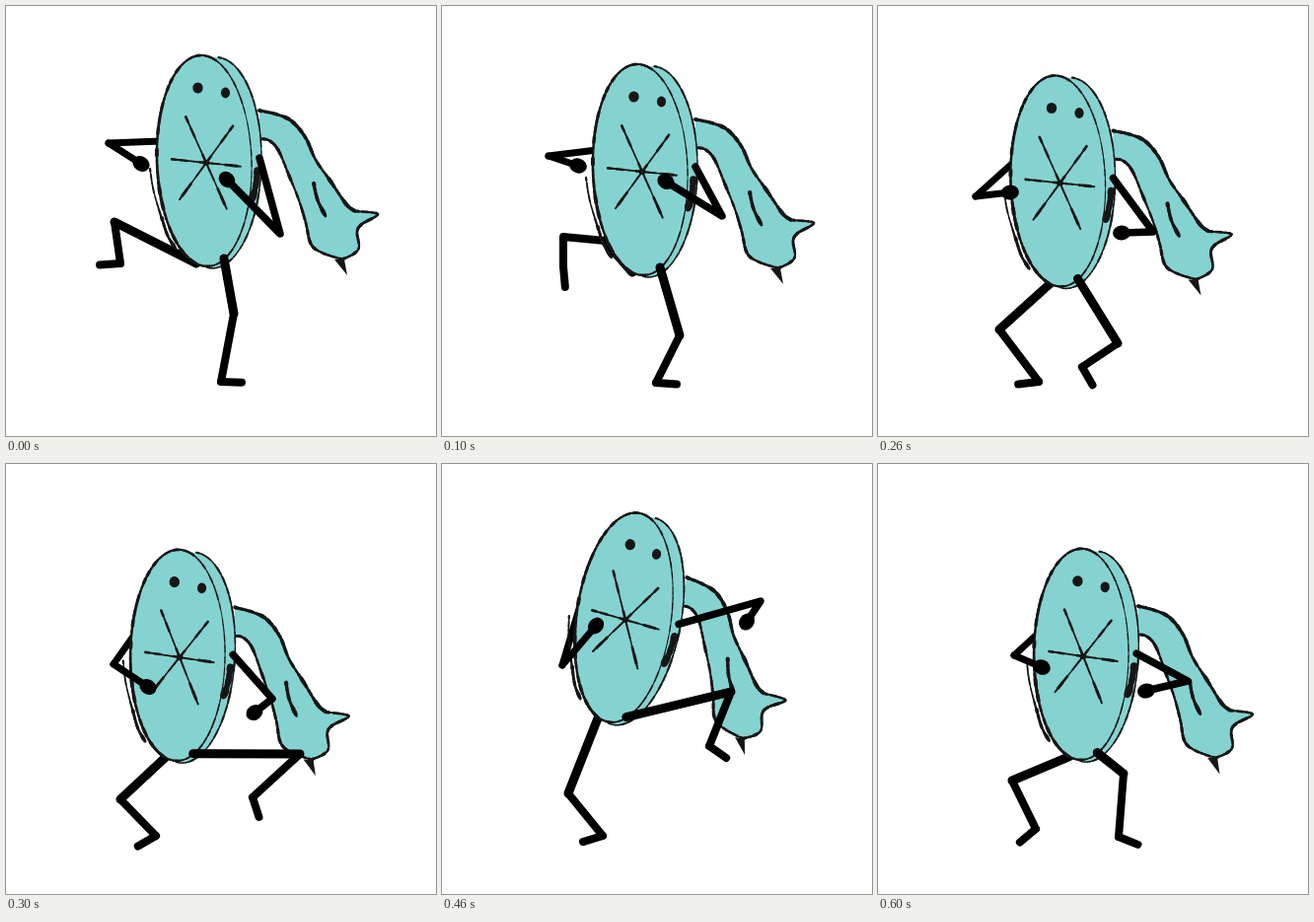
Animation, 436 px wide and 436 px high, one loop 700 ms. Source, as an HTML page with a canvas:

```html
<!DOCTYPE html>
<html lang="en">
<head>
<meta charset="utf-8">
<title>Running disc</title>
<style>
html, body { margin: 0; width: 100%; height: 100%; overflow: hidden; background: #fff; }
canvas { display: block; width: 100vw; height: 100vh; }
</style>
</head>
<body>
<canvas id="stage" width="436" height="436"></canvas>
<script>
const ctx = document.getElementById('stage').getContext('2d');
const STEP = 100, RAD = Math.PI / 180;
const TEAL = '#85d3d0', INK = '#161616', BLACK = '#000';

const parse = s => s.trim().split(/\s+/).map(p => p.split(',').map(Number));
const hash = n => { const v = Math.sin(n * 12.9898) * 43758.5453; return v - Math.floor(v); };

// Smooth curve through the given points.
function curve(s, n = 6) {
  const pts = parse(s), out = [];
  for (let i = 0; i < pts.length - 1; i++) {
    const a = pts[i - 1] || pts[i], b = pts[i], c = pts[i + 1], d = pts[i + 2] || c;
    for (let k = 0; k < n; k++) {
      const t = k / n;
      out.push([0, 1].map(j => 0.5 * (2 * b[j] + (c[j] - a[j]) * t +
        (2 * a[j] - 5 * b[j] + 4 * c[j] - d[j]) * t * t +
        (3 * b[j] - a[j] - 3 * c[j] + d[j]) * t * t * t)));
    }
  }
  return [...out, pts[pts.length - 1]];
}

// Leaning ellipse with its centre relative to the hub.
function oval(x, y, lean, from = 0, to = 360) {
  const out = [];
  for (let d = from; d <= to; d += 3) {
    const c = Math.cos(d * RAD), s = Math.sin(d * RAD);
    out.push([x + 48 * c + lean * s, y + 107 * s]);
  }
  return out;
}

function trace(pts) {
  ctx.beginPath();
  pts.forEach(p => ctx.lineTo(p[0], p[1]));
}

function fill(pts, color) {
  trace(pts);
  ctx.fillStyle = color;
  ctx.fill();
}

// Ink line of uneven weight; w is a number or a function of progress 0..1.
function pen(pts, w) {
  ctx.strokeStyle = INK;
  for (let i = 1; i < pts.length; i++) {
    const base = typeof w === 'function' ? w(i / pts.length) : w;
    ctx.lineWidth = base * (0.7 + 0.6 * hash(i));
    trace([pts[i - 1], pts[i]]);
    ctx.stroke();
  }
}

function dot(x, y, rx, ry, color = BLACK, turn = 0) {
  ctx.beginPath();
  ctx.ellipse(x, y, rx, ry, turn, 0, Math.PI * 2);
  ctx.fillStyle = color;
  ctx.fill();
}

function limb(pts, w) {
  ctx.strokeStyle = BLACK;
  ctx.lineWidth = w;
  trace(pts);
  ctx.stroke();
}

function scarf() {
  const upper = curve('54,-53 72,-49 87,-42 101,-25 111,-3 127,20 142,42 151,49');
  const hem = curve('151,49 174,52 158,62 153,70 155,85 150,92 138,98');
  const lower = curve('138,98 117,91 106,82 101,61 94,38 84,13 73,-13 63,-23 53,-24');
  fill([...upper, ...hem, ...lower], TEAL);
  pen(upper, 3.2);
  pen(hem, 2.6);
  pen(lower, 2.6);
  fill(parse('130,98 140,98 143,114'), INK);
  pen(curve('109,21 113,38 121,54'), 3.4);
}

function disc() {
  const rim = oval(8, 0, -2), face = oval(-2, -2, 3);
  fill(rim, TEAL);
  fill(face, TEAL);
  pen(oval(8, 0, -2, -87, 96), 1.7);
  pen(face, t => 2.2 - 1.1 * Math.cos(t * 2 * Math.PI));
  pen(curve('52,8 50,24 46,38'), 6);
  pen(curve('-57,6 -53,30 -43,63'), 1.8);
  pen(curve('-45,56 -39,74 -31,87'), 3);

  [35, 51, 46].forEach((len, i) => {
    const a = (6 + 60 * i) * RAD, x = len * Math.cos(a), y = len * Math.sin(a);
    pen(curve(`${-x},${-y} 0,0 ${x},${y}`), t => 1.4 + 1.2 * Math.abs(Math.sin(t * 9)));
  });
  dot(0, 0, 3.5, 3, INK);
  dot(-8.5, -76, 5.2, 5.6, INK);
  dot(19.5, -71, 4.6, 5.4, INK);
}

// Hub, tilt in degrees, then elbow + hand for each arm, knee + ankle for each leg
// and the direction of each foot.
const pose = (x, y, tilt, armL, armR, legL, footL, legR, footR) =>
  ({ x, y, tilt, armL, armR, legL, footL, legR, footR });

const poses = [
  pose(203, 159, 0, '104,139 137,160', '278,231 224,176', '110,219 116,261', 176, '231,312 218,381', 2),
  pose(203, 168, 0, '108,152 138,162', '284,213 227,178', '165,238 123,234 123,264', 85, '241,334 217,382', 4),
  pose(184.5, 179.5, 0, '99,193 134,189', '279,229 247,230', '123,328 163,381', 173, '243,342 207,366', 60),
  pose(176, 196, 2.5, '109,203 144,226', '270,238 252,252', '116,340 152,377', 150, '298,294 250,338', 72),
  pose(186, 158, 10, '122,204 156,164', '323,139 309,160', '128,334 163,377', 163, '293,231 271,286', 35),
  pose(208, 169, 3, '130,220 156,194', '317,150 297,187', '142,318 155,376', 160, '289,299 266,350', 18),
  pose(208, 195, 2.2, '138,194 166,206', '314,220 272,230', '136,321 160,370', 140, '249,314 244,378', 22)
];

// Place on the stage of a point fixed to the body.
function joint(p, dx, dy) {
  const c = Math.cos(p.tilt * RAD), s = Math.sin(p.tilt * RAD);
  return [p.x + dx * c - dy * s, p.y + dx * s + dy * c];
}

function hand(elbow, palm) {
  const turn = Math.atan2(palm[1] - elbow[1], palm[0] - elbow[0]);
  dot(palm[0], palm[1], 9, 7.5, BLACK, turn);
}

function leg(hip, joints, foot) {
  const pts = [hip, ...parse(joints)], ankle = pts[pts.length - 1];
  limb(pts, 8);
  limb(pts.slice(0, 2), 9);
  limb([ankle, [ankle[0] + 21 * Math.cos(foot * RAD), ankle[1] + 21 * Math.sin(foot * RAD)]], 8);
}

function withBody(p, draw) {
  ctx.save();
  ctx.translate(p.x, p.y);
  ctx.rotate(p.tilt * RAD);
  draw();
  ctx.restore();
}

function render(time) {
  const p = poses[Math.floor(time / STEP) % poses.length];
  const [elbowL, palmL] = parse(p.armL), [elbowR, palmR] = parse(p.armR);
  ctx.fillStyle = '#fff';
  ctx.fillRect(0, 0, 436, 436);
  ctx.lineCap = ctx.lineJoin = 'round';

  withBody(p, scarf);
  limb([joint(p, -46, -22), elbowL], 7);
  leg(joint(p, -10, 102), p.legL, p.footL);
  withBody(p, disc);
  limb([elbowL, palmL], 7);
  hand(elbowL, palmL);
  limb([joint(p, 54, -5), elbowR, palmR], 7.5);
  hand(elbowR, palmR);
  leg(joint(p, 18, 97), p.legR, p.footR);
}

let start;
function tick(now) {
  if (start === undefined) start = now;
  render(now - start);
  requestAnimationFrame(tick);
}
render(0);
requestAnimationFrame(tick);
</script>
</body>
</html>
```
